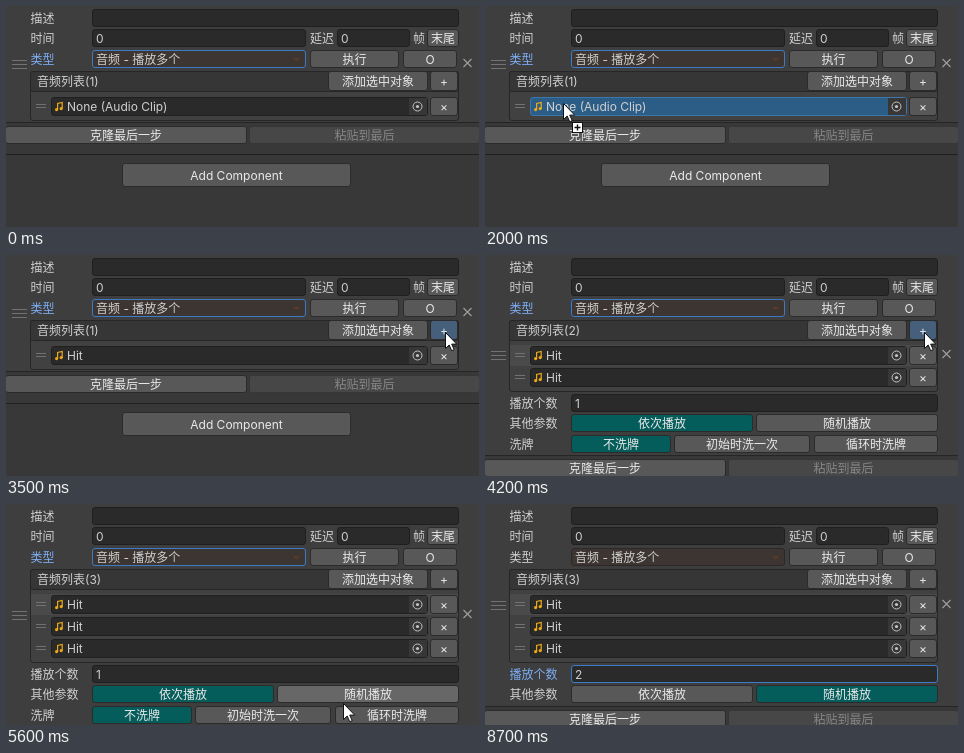
Recreate the animation shown at these times as an HTML page. Size 473 px wide and 221 px high, loop 8800 ms.

```html
<!DOCTYPE html>
<html lang="zh-CN">
<head>
<meta charset="utf-8">
<title>Audio list inspector</title>
<style>
html, body { margin: 0; width: 100%; height: 100%; overflow: hidden; background: #383838; }
svg { display: block; width: 473px; height: 221px; }
text { font: 12px Inter, "Noto Sans CJK SC", "Noto Sans CJK", sans-serif; white-space: pre; }
</style>
</head>
<body>
<svg id="stage" viewBox="0 0 473 221"></svg>
<script>
const stage = document.getElementById('stage');
const LOOP = 8800, STEP = 100;
const INK = '#d0d0d0', BLUE = '#7eaef5', FOCUS = '#3b7bc8', TEAL = '#045d5b';

// time, x, y, pointer kind: a = arrow, d = drag, i = text beam, '' = hidden
const PATH = [
  [0, 0, 0, ''], [100, 307, 42, 'a'], [200, 400, 48, 'a'], [300, 0, 0, ''],
  [1700, 0, 95, 'd'], [2000, 78, 97, 'd'], [2200, 78, 97, 'a'], [2300, 78, 97, 'a'],
  [2800, 205, 93, 'a'], [3200, 361, 77, 'a'], [3400, 432, 77, 'a'], [3500, 439, 77, 'a'],
  [4300, 439, 77, 'a'], [4600, 366, 125, 'a'], [4900, 225, 159, 'a'],
  [5000, 188.5, 166, 'i'], [5100, 189.5, 166, 'i'], [5200, 189.5, 166, 'i'],
  [5300, 222, 172, 'a'], [5600, 337, 199, 'a'], [5800, 333, 191, 'a'], [6100, 331, 190, 'a'],
  [6300, 240, 182, 'a'], [6400, 200.5, 174, 'i'], [6500, 180.5, 175, 'i'], [7200, 180.5, 175, 'i'],
  [7300, 300, 130, 'a'], [7400, 438, 114, 'a'], [7500, 0, 0, '']
];

function pointerAt(t) {
  let i = PATH.length - 1;
  while (PATH[i][0] > t) i--;
  const [t0, x, y, kind] = PATH[i], next = PATH[i + 1];
  if (!kind || !next || !next[3]) return { x, y, kind };
  const k = (t - t0) / (next[0] - t0);
  return { x: x + (next[1] - x) * k, y: y + (next[2] - y) * k, kind };
}

let mouse;
const over = (x, y, w, h) => mouse.kind &&
  mouse.x >= x && mouse.x <= x + w && mouse.y >= y - 1 && mouse.y <= y + h + 1;

const path = (d, stroke, width = 1, fill = 'none') =>
  `<path d="${d}" stroke="${stroke}" stroke-width="${width}" fill="${fill}"/>`;

const fillRect = (x, y, w, h, fill) =>
  `<rect x="${x}" y="${y}" width="${w}" height="${h}" fill="${fill}"/>`;

const circle = (x, y, r, fill, stroke = 'none') =>
  `<circle cx="${x}" cy="${y}" r="${r}" fill="${fill}" stroke="${stroke}"/>`;

const box = (x, y, w, h, fill, stroke, r = 2.5) =>
  `<rect x="${x + .5}" y="${y + .5}" width="${w - 1}" height="${h - 1}" rx="${r}" fill="${fill}" stroke="${stroke}"/>`;

const text = (s, x, mid, fill = INK, anchor = 'start') =>
  `<text x="${x}" y="${Math.round(mid + 4.5)}" fill="${fill}" text-anchor="${anchor}">${s}</text>`;

const label = (s, mid, focus) => text(s, 24.5, mid, focus ? BLUE : INK);

function button(s, x, y, w, h = 18, mode = '') {
  const fills = { on: TEAL, press: '#46607c', off: '#474747', still: '#585858' };
  const fill = fills[mode] || (over(x, y, w, h) ? '#676767' : '#585858');
  return box(x, y, w, h, fill, mode === 'off' ? '#363636' : '#2b2b2b') +
    text(s, x + w / 2, y + h / 2, mode === 'off' ? '#868686' : '#eaeaea', 'middle');
}

function field(s, x, y, w, focus) {
  const edge = focus ? FOCUS : over(x, y, w, 18) ? '#656565' : '#1f1f1f';
  return box(x, y, w, 18, '#2a2a2a', edge) + text(s, x + 4, y + 9);
}

const grip = (x, y, w, gaps) =>
  path(gaps.map(g => `M${x} ${y + g + .5}h${w}`).join(''), '#727272');

function clipRow(y, name) {
  const hover = over(45, y, 358, 19), drop = hover && mouse.kind === 'd';
  const edge = drop ? '#3d76a8' : hover ? '#686868' : '#1f1f1f';
  return grip(30, y + 9, 10, [-2, 1]) +
    box(45, y, 377, 19, drop ? '#2c5d87' : '#2a2a2a', edge) +
    fillRect(403, y + 1, 18, 17, '#373737') +
    circle(411.5, y + 9.5, 4.5, 'none', '#c4c4c4') +
    circle(411.5, y + 9.5, 1.6, '#c4c4c4') +
    path(`M51.6 ${y + 12.5}v-6l4.6-1v6`, '#eda916', 1.2) +
    circle(50.6, y + 12.6, 1.6, '#eda916') +
    circle(55.2, y + 11.6, 1.6, '#eda916') +
    text(name, 61, y + 9.5) +
    button('×', 424, y, 28, 19);
}

function header(s) {
  return label('描述', 12) + field('', 86, 3, 367) +
    label('时间', 32) + field('0', 86, 23, 214) +
    text('延迟', 304, 32) + field('0', 331, 23, 73) +
    text('帧', 407, 32) + button('末尾', 421, 23, 32) +
    label('类型', 53, s.typeFocus) +
    box(86, 44, 214, 18, '#3d3531', s.typeFocus ? FOCUS : '#2b2928') +
    text('音频 - 播放多个', 90, 53) +
    path('M287 52h7l-3.5 3.5z', 'none', 0, '#5a3b29') +
    button('执行', 304, 44, 89) + button('O', 397, 44, 54);
}

function list(s) {
  const end = 92 + 22 * s.n;
  let out = box(24, 65, 429, end - 64, '#414141', '#262626') +
    box(24, 65, 429, 21, '#363636', '#262626') +
    text(`音频列表(${s.n})`, 31, 75) +
    button('添加选中对象', 322, 65, 100, 20, 'still') +
    button('+', 424, 65, 28, 20, s.addPress ? 'press' : '');
  if (s.n > 1) out += fillRect(25, 90, 427, 21, '#4a4a4a');
  for (let i = 0; i < s.n; i++) out += clipRow(91 + 22 * i, s.clip);
  return out;
}

function options(s) {
  const y = 95 + 22 * s.n;
  let out = label('播放个数', y + 9, s.countFocus) +
    field(s.count, 86, y, 367, s.countFocus);
  if (s.countFocus && s.count === 1)
    out += fillRect(89, y + 2, 7, 14, '#3a72b0') + text('1', 90, y + 9);
  if (s.caret) out += fillRect(96, y + 2, 1, 15, INK);
  out += label('其他参数', y + 29) +
    button('依次播放', 86, y + 20, 182, 18, s.random ? '' : 'on') +
    button('随机播放', 271, y + 20, 182, 18, s.random ? 'on' : s.randomPress ? 'press' : '');
  const z = y + 41;
  if (!s.random)
    out += label('洗牌', z + 9) + button('不洗牌', 86, z, 100, 18, 'on') +
      button('初始时洗一次', 189, z, 136) + button('循环时洗牌', 329, z, 124);
  else if (s.count === 1)
    out += label('限制', z + 9) + button('无限制', 86, z, 182, 18, 'on') +
      button('不重复', 271, z, 182);
  return out;
}

function footer(y) {
  return fillRect(0, y, 473, 221, '#383838') + fillRect(0, y, 473, 1, '#252525') +
    button('克隆最后一步', -1, y + 4, 242) +
    button('粘贴到最后', 243, y + 4, 231, 18, 'off') +
    fillRect(0, y + 32, 473, 1, '#1f1f1f') +
    button('Add Component', 116, y + 41, 229, 24);
}

function pointer() {
  const { x, y, kind } = mouse;
  if (!kind) return '';
  const at = `<g transform="translate(${x.toFixed(1)} ${y.toFixed(1)})">`;
  if (kind === 'i') {
    const beam = 'M-3 -7.5h2.2l.8 1 .8-1h2.2M0 -6.5v13M-3 7.5h2.2l.8-1 .8 1h2.2';
    return at + path(beam, '#e8e8e8') + '</g>';
  }
  const badge = kind === 'd'
    ? box(9, 19, 11, 11, '#fff', '#111', 0) + path('M11.5 24.5h6M14.5 21.5v6', '#111', 1.4) : '';
  return at + path('M.5 .5v16l3.7-3.5 2.5 5.7 2.5-1.1-2.5-5.5h5z', '#111', 1, '#fff') + badge + '</g>';
}

function draw(t) {
  const s = {
    typeFocus: t < 900 || (t >= 1700 && t < 6500),
    clip: t < 2200 ? 'None (Audio Clip)' : 'Hit',
    n: t < 3700 ? 1 : t < 4300 ? 2 : 3,
    addPress: t === 3500 || t === 3600 || t === 4200,
    randomPress: t === 5800,
    random: t >= 5900,
    countFocus: t >= 6500,
    count: t < 7100 ? 1 : 2,
    caret: t >= 7100 && t < 8700
  };
  mouse = pointerAt(t);
  const extra = s.n === 1 ? 0 : s.random && s.count > 1 ? 42 : 62;
  const bottom = 94 + 22 * s.n + extra, mid = bottom / 2;
  stage.innerHTML = fillRect(0, 0, 473, bottom, '#3e3e3e') +
    grip(6, mid, 15, [-4, 0, 4]) +
    path(`M457.5 ${mid - 5}l8 8m0-8l-8 8`, '#a0a0a0', 1.1) +
    header(s) + list(s) + (s.n > 1 ? options(s) : '') +
    footer(bottom) + pointer();
}

let shown = -1;
const start = performance.now();
function tick() {
  const t = Math.floor((performance.now() - start) % LOOP / STEP) * STEP;
  if (t !== shown) draw(shown = t);
  requestAnimationFrame(tick);
}
tick();
</script>
</body>
</html>
```
